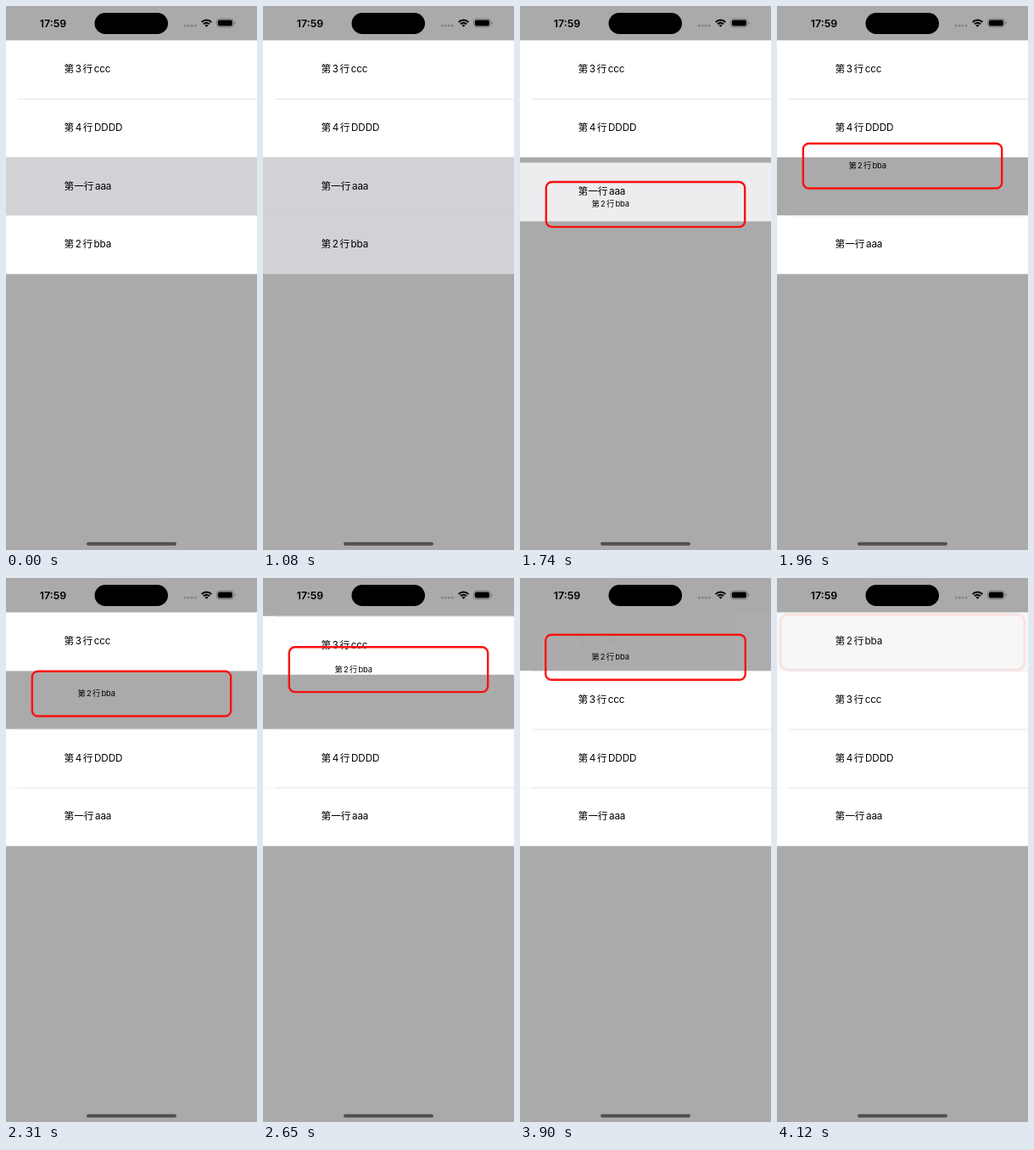
Animation of 296 by 640 pixels, one loop 5.55 s. Source, as an HTML page:

```html
<!DOCTYPE html>
<html lang="zh-CN">
<head>
<meta charset="utf-8">
<title>Row reorder</title>
<style>
  html, body { margin: 0; width: 100%; height: 100%; overflow: hidden; background: #aaa; }
  #stage {
    position: relative; width: 296px; height: 640px; overflow: hidden; background: #aaa; color: #000;
    font: 11.7px Inter, "Noto Sans CJK SC", "Noto Sans CJK", sans-serif;
    letter-spacing: -.1px; word-spacing: -1.6px; text-autospace: no-autospace;
  }
  .row, #card {
    position: absolute; left: 0; top: 0; width: 296px; height: 68.65px;
    line-height: 68.65px; padding-left: 68.6px; box-sizing: border-box; white-space: nowrap;
  }
  .row { background: #fff; }
  .row::before {
    content: ""; position: absolute; left: 14px; right: 0; top: 0; height: 1px;
    background: #e6e6e8; opacity: var(--line, 0);
  }
  #card::before {
    content: ""; position: absolute; inset: 0; border: 3.6px solid #fa1010; border-radius: 10px;
  }
  svg { position: absolute; left: 0; top: 0; }
  #clock { font-size: 12.4px; font-weight: 600; letter-spacing: 0; }
</style>
</head>
<body>
<div id="stage">
  <div class="row" id="c">第 3 行 ccc</div>
  <div class="row" id="d">第 4 行 DDDD</div>
  <div class="row" id="a">第一行 aaa</div>
  <div class="row" id="b">第 2 行 bba</div>
  <div id="card">第 2 行 bba</div>
  <svg width="296" height="640" viewBox="0 0 296 640">
    <text id="clock" x="55.5" y="24.6" text-anchor="middle">17:59</text>
    <rect x="104.5" y="8" width="86.5" height="25" rx="12.5"/>
    <g fill="#858585">
      <circle cx="211.2" cy="23.2" r="1.4"/><circle cx="215.2" cy="23.2" r="1.4"/>
      <circle cx="219.2" cy="23.2" r="1.4"/><circle cx="223.2" cy="23.2" r="1.4"/>
    </g>
    <g transform="translate(236.5 24.8)">
      <path d="M-5.8 -5.8A8.2 8.2 0 0 1 5.8 -5.8M-3.5 -3.5A5 5 0 0 1 3.5 -3.5" fill="none" stroke="#000" stroke-width="2"/>
      <path d="M0 0L-2 -2A2.8 2.8 0 0 1 2 -2Z"/>
    </g>
    <rect x="248.4" y="15.2" width="20" height="9.6" rx="3.2" fill="none" stroke="#6c6c6c" stroke-width=".8"/>
    <rect x="249.8" y="16.5" width="17.2" height="7" rx="2"/>
    <path d="M269.6 18.4a1.7 1.7 0 0 1 0 3.2z" fill="#6c6c6c"/>
    <rect x="95" y="630.7" width="106" height="4" rx="2" fill="#505050"/>
  </svg>
</div>
<script>
  const LOOP = 5550, TOP = 40.4, PITCH = 68.65, GRAY = [209, 209, 214];
  // Moments at which the screen refreshes
  const TICKS = [0, 1080, 1410, 1520, 1630, 1740, 1850, 1960, 2080, 2200, 2310,
                 2430, 2540, 2650, 2760, 2870, 3420, 3900, 4010, 4120];
  // Finger height over time
  const DRAG = [[1370, 281], [1520, 269.7], [1630, 256], [1960, 188], [2310, 136],
                [2540, 112], [2870, 98.7], [3420, 93.5]];
  const el = id => document.getElementById(id);
  const [rowA, rowB, rowC, rowD, card] = ['a', 'b', 'c', 'd', 'card'].map(el);

  const mix = (p, q, k) => p + (q - p) * k;
  const ease = (t, start, length) => {
    const x = Math.min(1, Math.max(0, (t - start) / length));
    return x * x * (3 - 2 * x);
  };

  function fingerY(t) {
    const i = DRAG.findIndex(k => k[0] > t);
    if (i === 0) return DRAG[0][1];
    if (i < 0) return DRAG[DRAG.length - 1][1];
    const [t0, y0] = DRAG[i - 1], [t1, y1] = DRAG[i];
    return mix(y0, y1, (t - t0) / (t1 - t0));
  }

  function place(row, slot, line, selected = 0) {
    row.style.transform = `translateY(${TOP + PITCH * slot}px)`;
    row.style.background = `rgb(${GRAY.map(v => mix(255, v, selected))})`;
    row.style.setProperty('--line', line);
  }

  function draw(t) {
    const lift = t < 1410 ? 0 : ease(t, 1370, 260);
    const drop = t < 3900 ? 0 : ease(t, 3875, 300);
    const held = lift * (1 - drop);

    place(rowC, ease(t, 2610, 260), t >= 2650 ? 1 : 0);
    place(rowD, 1 + ease(t, 2050, 260), 1);
    place(rowA, 2 + ease(t, 1690, 260), t >= 1960 ? 1 : 0, 1 - ease(t, 1590, 260));
    place(rowB, t < 2000 ? 3 : 0, 0, t >= 1080 && t < 1410 ? 1 : 0);
    rowB.style.opacity = 1 - held;

    const y = mix(fingerY(t), 73.5, drop) - PITCH / 2;
    card.style.opacity = held;
    card.style.transform = `translateY(${y}px) scale(${1 - .2 * held})`;
  }

  const begin = performance.now();
  let shown = -1;
  function frame() {
    const now = Math.max(0, performance.now() - begin) % LOOP;
    const tick = TICKS.filter(t => t <= now).pop();
    if (tick !== shown) draw(shown = tick);
    requestAnimationFrame(frame);
  }
  frame();
</script>
</body>
</html>
```
